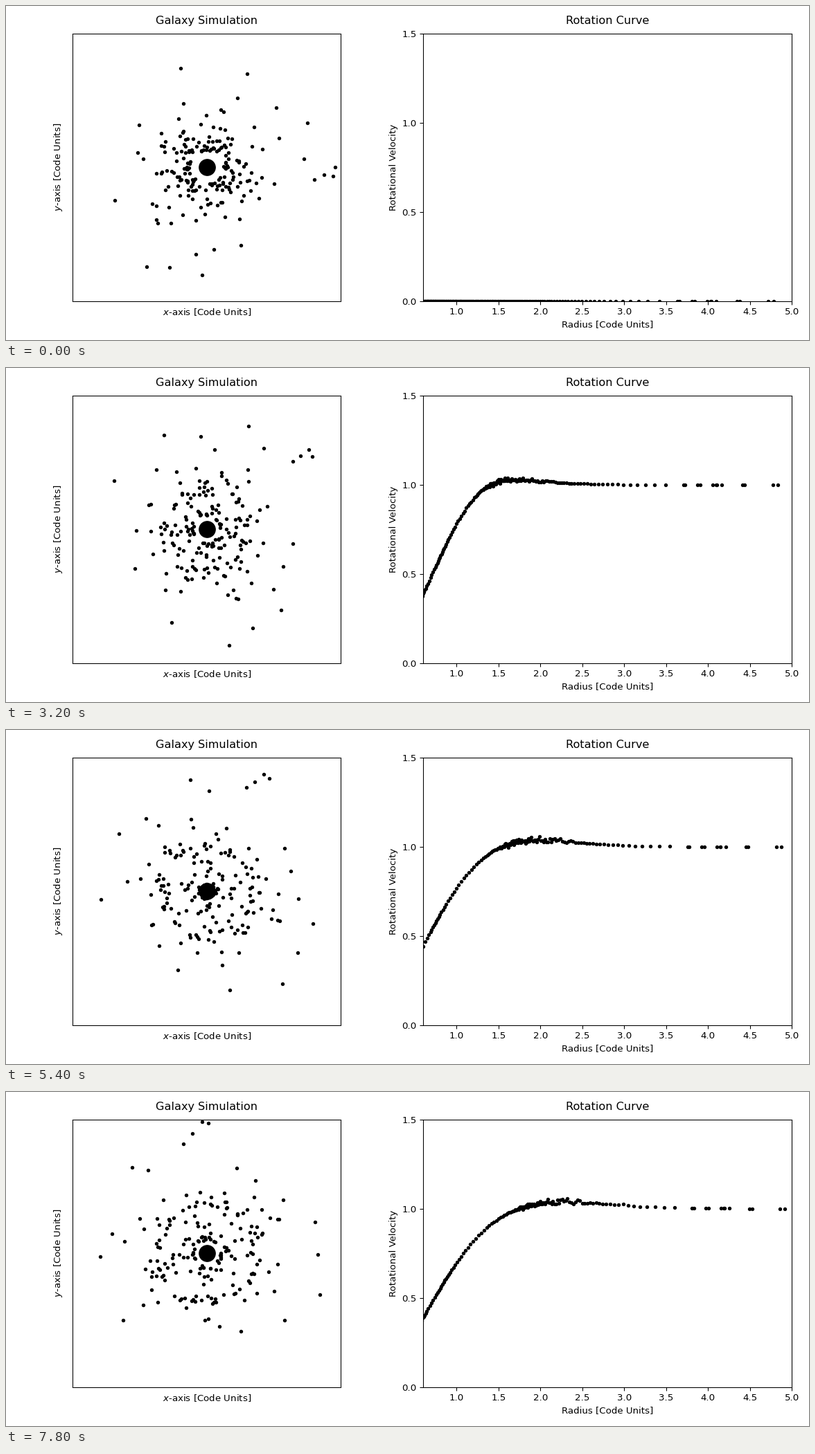
Write a matplotlib script that moves like this. It is 1159x483 px and loops after 8 s.

```python
import numpy as np
import matplotlib.pyplot as plt
from matplotlib.animation import FuncAnimation

W, H, DPI = 1159, 483, 96.6
FRAMES, DT = 40, 0.2

# A few lone stars at the rim, in code units
RIM = [(4.78, 0.0), (4.71, -0.32), (4.37, -0.27), (4.01, -0.46),
       (3.75, 1.66), (3.62, 0.32), (-3.44, -1.24), (-0.18, -4.03),
       (-2.25, -3.72), (-1.40, -3.74), (1.50, 3.50), (-0.98, 3.71)]


def smooth(x):
    x = np.clip(x, 0, 1)
    return x * x * (3 - 2 * x)


def falloff(r, edge, width):
    """1 inside the edge, 0 outside, with a soft step between."""
    return 0.5 - 0.5 * np.tanh((r - edge) / width)


def start_state(rng, count=180):
    x, y = np.array(RIM).T
    r = 0.61 - 0.8 * np.log(1 - np.linspace(0, 0.97, count))
    a = rng.uniform(0, 2 * np.pi, count)
    return np.append(np.hypot(x, y), r), np.append(np.arctan2(y, x), a)


def radius(r0, t):
    """Outer orbits widen slowly; the innermost dip toward the core."""
    core, near = falloff(r0, 0.76, 0.03), falloff(r0, 0.92, 0.08)
    growth = (1 - near) * (1 + 0.5 * np.exp(-((r0 - 1.15) / 0.25) ** 2))
    dip = np.exp(-((t - 5.2) / 1.7) ** 2)
    shrink = (0.35 * core + 0.15 * near) * dip + 0.16 * core * t / 7.8
    return np.sqrt(r0 ** 2 + 0.1665 * t * growth) * (1 - shrink)


def speed(r, t, noise):
    """A rise to a flat curve, plus a hump that drifts outward."""
    power = 4.9 - 2.15 * smooth(t / 5)
    scale = 1.02 + 0.0085 * (t - 3.8) ** 2
    rise = np.sqrt(1 - np.exp(-(r / scale) ** power))
    hump = np.exp(-(np.log(r / (1.15 + 0.14 * t)) / 0.35) ** 2)
    return rise + (0.04 * hump + noise * hump ** 2) * smooth(t / 4.6)


def simulate():
    rng = np.random.default_rng(7)
    r0, angle = start_state(rng)
    noise = rng.normal(0, 0.01, r0.size)
    states = [(r0, angle, np.zeros_like(r0))]
    for n in range(1, FRAMES):
        r = radius(r0, n * DT)
        v = speed(r, n * DT, noise)
        angle = angle + v * DT / ((r + states[-1][0]) / 2)
        states.append((r, angle, v))
    return states


def panel(x, width, title):
    ax = fig.add_axes([x / W, 56.3 / H, width / W, 386.8 / H])
    ax.set_title(title, pad=10)
    return ax


plt.rcParams["font.family"] = "DejaVu Sans"
fig = plt.figure(figsize=(12, 5), dpi=DPI, facecolor="white")

sky = panel(96.4, 386.8, "Galaxy Simulation")
sky.set(xlim=(-5, 5), ylim=(-5, 5), xticks=[], yticks=[])
sky.set_xlabel("$x$-axis [Code Units]", labelpad=6.3)
sky.set_ylabel("$y$-axis [Code Units]", labelpad=9.5)
sky.plot(0, 0, "ko", markersize=17.4)
stars, = sky.plot([], [], "k.", markersize=6)

curve = panel(602, 532, "Rotation Curve")
curve.set(xlim=(0.6, 5), ylim=(0, 1.5), xlabel="Radius [Code Units]",
          ylabel="Rotational Velocity", xticks=np.arange(1, 5.1, 0.5),
          yticks=np.arange(0, 1.6, 0.5))
speeds, = curve.plot([], [], "k.", markersize=6)

STATES = simulate()


def draw(n):
    r, a, v = STATES[n]
    stars.set_data(r * np.cos(a), r * np.sin(a))
    speeds.set_data(r, v)
    return stars, speeds


anim = FuncAnimation(fig, draw, frames=FRAMES, init_func=lambda: draw(0),
                     interval=200, repeat=True, repeat_delay=0)
plt.show()
```
